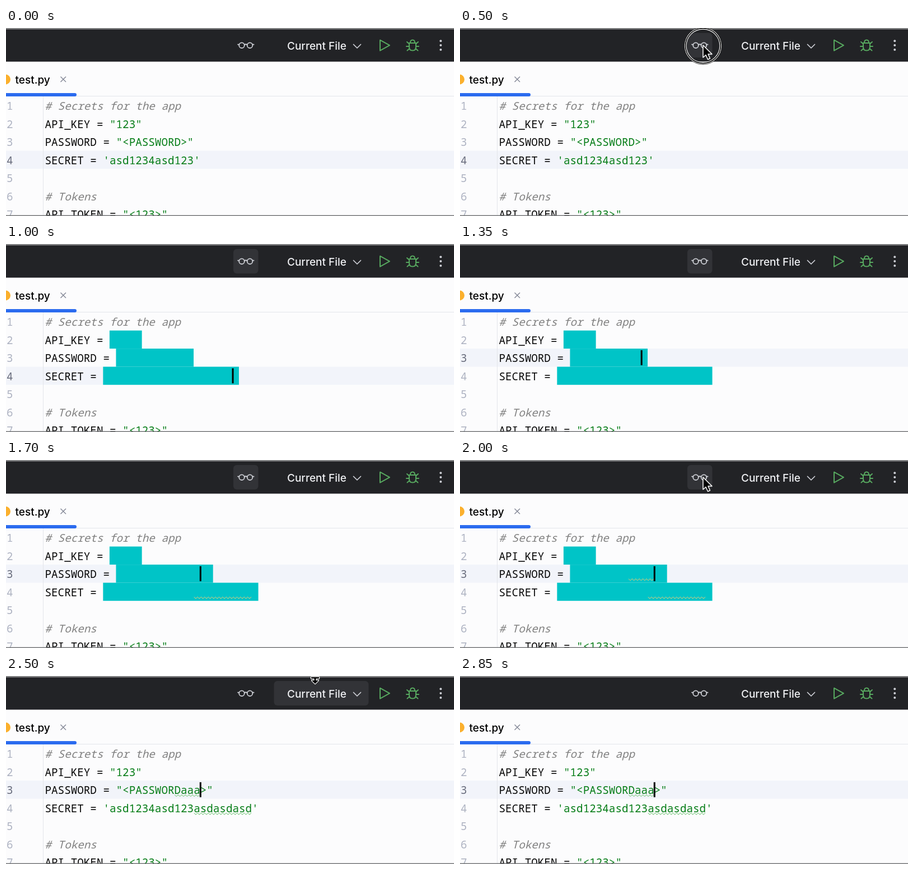
Recreate the animation shown at these times as an HTML page. Size 800x338 px, loop 2900 ms.

```html
<!DOCTYPE html>
<html lang="en">
<head>
<meta charset="utf-8">
<title>Secrets masking</title>
<style>
html, body { margin: 0; width: 100%; height: 100%; overflow: hidden; background: #fcfcfd; }
svg { display: block; }
text { font: 500 19px Inter, sans-serif; white-space: pre; }
#code text { font: 500 19.25px "Noto Sans Mono", monospace; fill: #080808; }
#code .num { fill: #aeb3c2; }
#code .num.now { fill: #686c7c; }
#code .note { fill: #808080; font-style: italic; }
.str { fill: #067d17; }
.line { fill: none; stroke-width: 2; stroke-linecap: round; stroke-linejoin: round; }
.wave { fill: none; stroke-width: 1.1; }
#tip rect { filter: drop-shadow(0 4px 9px #0005); }
</style>
</head>
<body>
<svg width="800" height="338" viewBox="0 0 800 338">
  <rect width="800" height="338" fill="#fcfcfd"/>
  <rect id="row" width="800" height="32.5" fill="#f2f4fa"/>
  <path d="M66.5 123V337M0 122.5H800" stroke="#e3e5ea"/>
  <g id="code"></g>
  <g id="masks" fill="#00c4c7"></g>
  <path id="wave3" class="wave"/>
  <path id="wave4" class="wave"/>
  <rect id="caret" width="3" height="27"/>
  <g id="bulb">
    <circle cx="90.6" cy="163.8" r="7.7" fill="#fba31b"/>
    <path d="M87.6 174H93.6M88.6 177H92.6" stroke="#6c707e" stroke-width="1.5"/>
  </g>
  <path d="M0 337.3H800" stroke="#77787a" stroke-width="1.5"/>

  <rect width="800" height="60.5" fill="#222326"/>
  <rect width="800" height="2.5" fill="#858687"/>
  <rect id="eyeHover" x="406" y="9" width="44.5" height="44" rx="6" fill="#323337"/>
  <rect id="runHover" x="478.5" y="9" width="169" height="44" rx="6" fill="#323337"/>
  <g class="line" stroke="#ced0d6">
    <g stroke-width="1.8">
      <circle cx="421" cy="31.2" r="4.8"/><circle cx="435.5" cy="31.2" r="4.8"/>
      <path d="M426 30.2Q428.2 28.2 430.5 30.2M414 29.7H416.3M440.2 29.7H442.5"/>
    </g>
    <path d="M620.5 29.5L627 36L633.5 29.5" stroke-width="1.7"/>
  </g>
  <text x="502" y="38.5" fill="#f0f1f4">Current File</text>
  <g class="line" stroke="#57a85f">
    <path d="M668 21.7V40.7L685 31.2Z"/>
    <path d="M720 27H732V34Q732 40.5 726 40.5T720 34ZM722 26.5Q722 21.5 726 21.5T730 26.5M720 28.5L716 25M732 28.5L736 25M719.5 33H715M732.5 33H737M720.5 37L716.5 40.5M731.5 37L735.5 40.5"/>
  </g>
  <g fill="#ced0d6">
    <circle cx="776.3" cy="23.2" r="2"/><circle cx="776.3" cy="31.1" r="2"/><circle cx="776.3" cy="39" r="2"/>
  </g>

  <circle cx="-1" cy="92.5" r="9" fill="#fbb02d"/>
  <text x="16.5" y="99.5">test.py</text>
  <path d="M97.5 87.5L107 97M107 87.5L97.5 97" stroke="#818594" stroke-width="1.4"/>
  <rect x="-6" y="117" width="132" height="6" rx="3" fill="#2b6bef"/>

  <g id="tip">
    <rect x="398" y="84.5" width="255.5" height="50.5" rx="5" fill="#222326"/>
    <text x="416.5" y="115.7" fill="#f0f1f4">Toggle Secrets Masking</text>
  </g>
  <g id="ring" fill="none">
    <circle cx="434" cy="32" r="31.3" stroke="#fff" stroke-width="4"/>
    <circle cx="434" cy="32" r="31.3" stroke="#111" stroke-width="1.8"/>
    <circle cx="434" cy="32" r="33.6" stroke="#111" stroke-width=".8"/>
  </g>
  <g stroke="#fff" stroke-width="1.5" stroke-linejoin="round">
    <path id="arrow" d="M0 0V22L5 17.5L8.5 25.5L12.5 23.8L9 16H16Z"/>
    <path id="resize" paint-order="stroke" stroke-width="2.4" d="M-7 -5H7V-2.5H1.5V1H6L0 7L-6 1H-1.5V-2.5H-7Z"/>
  </g>
</svg>
<script>
const LOOP = 2900, STEP = 50, CHAR = 11.55, LEFT = 70, PITCH = 32.55;
const $ = id => document.getElementById(id);
const show = (id, on) => $(id).style.display = on ? '' : 'none';
const col = n => LEFT + n * CHAR;
const rowTop = row => 123 + (row - 1) * PITCH;
const clamp = (v, a, b) => Math.min(b, Math.max(a, v));

function place(el, attrs) {
  for (const k in attrs) el.setAttribute(k, attrs[k]);
}

const lines = [
  ['# Secrets for the app'],
  ['API_KEY = ', '"123"'],
  ['PASSWORD = ', '"<PASSWORD>"'],
  ['SECRET = ', "'asd1234asd123'"],
  [''],
  ['# Tokens'],
  ['API_TOKEN = ', '"<123>"']
];

$('code').innerHTML = lines.map(([name, value = ''], i) => {
  const y = rowTop(i + 1) + 24;
  const safe = value.replace(/</g, '&lt;');
  return `<text class="num" x="1" y="${y}">${i + 1}</text>` +
    `<text class="${name[0] === '#' ? 'note' : ''}" x="${LEFT - 0.5}" y="${y}">${name}<tspan class="str">${safe}</tspan></text>`;
}).join('');
$('masks').innerHTML = '<rect/>'.repeat(3);
const nums = document.querySelectorAll('.num');
const values = document.querySelectorAll('.str');
const masks = $('masks').children;

function wave(row, from, to) {
  let d = '', up = 0;
  for (let x = col(from); x < col(to); x += 3.2) d += `${d ? 'L' : 'M'}${x} ${rowTop(row) + 28.5 - 3 * (up ^= 1)}`;
  return d;
}
$('wave3').setAttribute('d', wave(3, 20, 24));
$('wave4').setAttribute('d', wave(4, 23, 32));

const insert = (s, text, fromEnd) => s.slice(0, s.length - fromEnd) + text + s.slice(s.length - fromEnd);
const typed = (t, start, total) => clamp(Math.floor((t - start) / STEP) + 1, 0, total);

// Pointer stops: time, x, y
const stops = [[100, 552, 7], [400, 434, 31], [2000, 434, 31], [2100, 432, 26.5], [2350, 432, 26.5], [2500, 552, 7]];
function pointer(t) {
  const i = clamp(stops.findIndex(s => s[0] >= t), 1, stops.length - 1);
  const [t0, x0, y0] = stops[i - 1], [t1, x1, y1] = stops[i];
  const k = clamp((t - t0) / (t1 - t0), 0, 1), e = k * k * (3 - 2 * k);
  return [x0 + (x1 - x0) * e, y0 + (y1 - y0) * e];
}

function draw(t) {
  const secret = typed(t, 750, 9), pass = typed(t, 1500, 3);
  const row = t < 1250 ? 4 : 3;
  const masked = t >= 550 && t < 2350;
  const texts = lines.map(l => l[1] || '');
  texts[2] = insert(texts[2], 'a'.repeat(pass), 2);
  texts[3] = insert(texts[3], 'asdasdasd'.slice(0, secret), 1);

  values.forEach((el, i) => { if (el.textContent !== texts[i]) el.textContent = texts[i]; });
  nums.forEach((el, i) => el.classList.toggle('now', i + 1 === row));
  place($('row'), { y: rowTop(row) });

  show('masks', masked);
  [1, 2, 3].forEach((n, i) => place(masks[i], {
    x: col(lines[n][0].length) - 0.6, y: rowTop(n + 1), width: texts[n].length * CHAR, height: PITCH
  }));

  for (const id of ['wave3', 'wave4']) place($(id), { stroke: masked ? '#a6c98c' : '#8fcf93' });
  show('wave3', t >= 1850);
  show('wave4', t >= 1500);

  const end = row === 4 ? 23 + secret : t < 1350 ? 23 : t < 1400 ? 22 : 21 + pass;
  place($('caret'), { x: col(end) - 1.4, y: rowTop(row) + 2.8 });
  show('caret', t >= 700);
  show('bulb', t >= 2050 && t < 2350);

  const [x, y] = pointer(t);
  const moving = t >= 100 && t < 700 || t >= 2000 && t <= 2500;
  const edge = y < 9;
  for (const id of ['arrow', 'resize']) place($(id), { transform: `translate(${x} ${y})` });
  show('arrow', moving && !edge);
  show('resize', moving && edge);
  show('eyeHover', t >= 400 && t < 2400);
  show('runHover', moving && x > 478 && x < 648);
  show('tip', t >= 2150 && t < 2300);
  show('ring', t >= 450 && t < 600 || t >= 2300 && t < 2400);
}

function tick() {
  const t = performance.now() % LOOP;
  draw(Math.floor(t / STEP) * STEP);
  requestAnimationFrame(tick);
}
tick();
</script>
</body>
</html>
```
